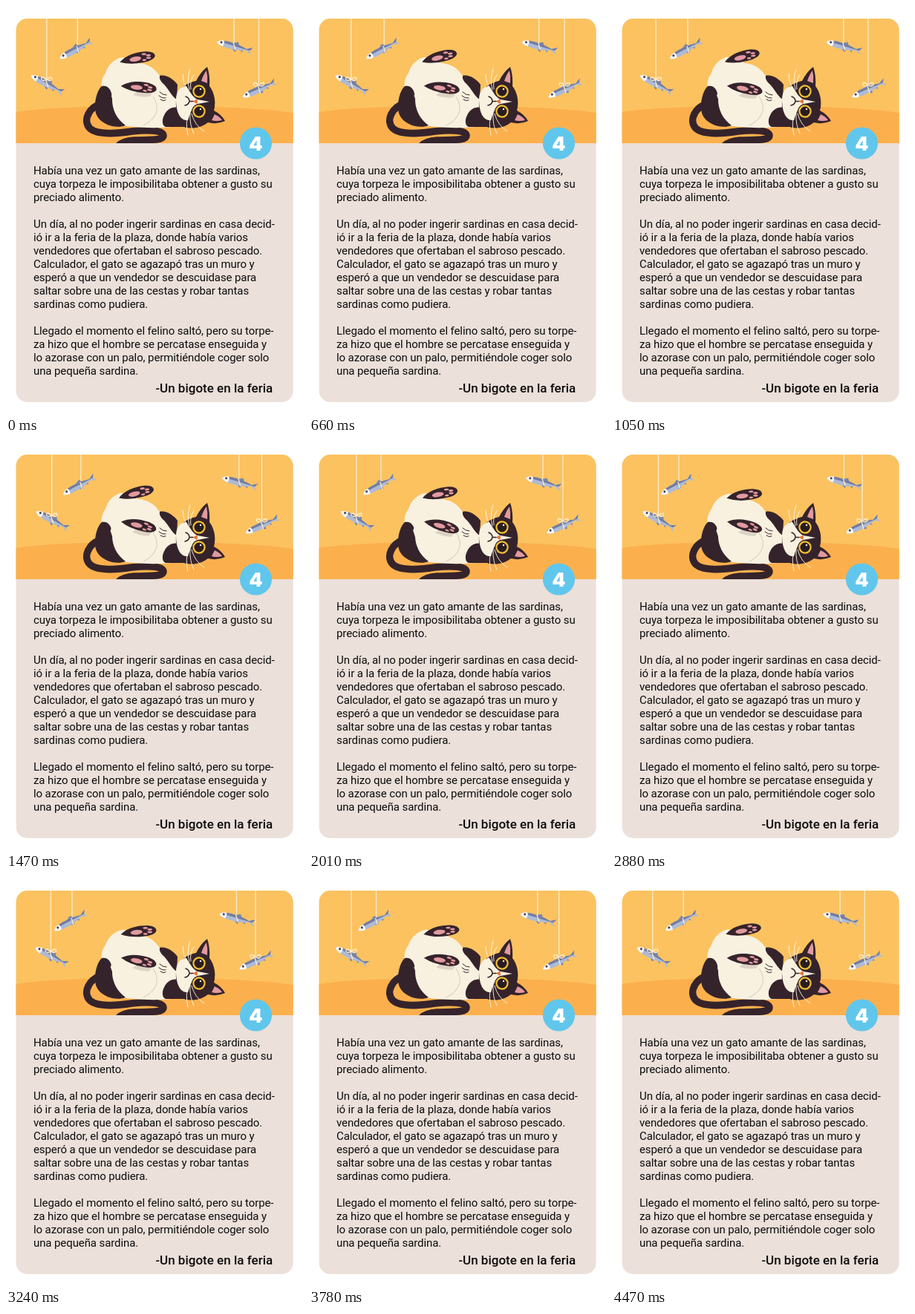
These frames come from a looping animation (400 by 550 pixels, 4.5 s). An HTML page:

```html
<!DOCTYPE html>
<html lang="es">
<head>
<meta charset="utf-8">
<style>
  html, body { margin: 0; height: 100%; overflow: hidden; background: #fff; }
  svg { display: block; width: 400px; height: 550px; }
  text { font-family: Roboto, sans-serif; fill: #0d0c0c; }
  #story { font-size: 15px; letter-spacing: -.1px; }
  #number { font: 900 26px Inter, sans-serif; fill: #fff; }
  .dark { fill: #35232b; }
  .cream { fill: #f8f1e0; }
  .pink { fill: #e19a9f; }
  .line { fill: none; stroke: #35232b; stroke-linecap: round; }
  .whisker { fill: none; stroke: #fff6e6; stroke-width: .9; stroke-linecap: round; }
  .string { fill: none; stroke: #fdeccb; stroke-width: 1.3; }
</style>
</head>
<body>
<svg viewBox="0 0 400 550">
  <defs>
    <clipPath id="card"><rect x="13.6" y="17" width="373" height="517" rx="15"/></clipPath>
    <clipPath id="scene"><rect x="13" y="17" width="374" height="168"/></clipPath>
    <g id="fish">
      <path fill="#7985ab" d="M-5-3 L4-7 L7-2Z M-3 3 L3 7 L5 2Z M8 2 L13 5 L12 1Z"/>
      <path fill="#aebad6" d="M-24 0 C-20-4-8-4 0-4 C8-3 13-2 17-1 L25-5 L22 0 L25 5 L17 1 C9 4-5 5-14 4 Q-22 3-24 0Z"/>
      <path fill="#717da3" d="M-15-4 C-8-5 8-4 17-1 L25-5 L22 0 C10 0-3-1-14-1Z"/>
      <path fill="#f8f6f4" d="M-24 0 Q-20-4-15-4 Q-13 0-15 4 Q-22 3-24 0Z"/>
      <circle cx="-18" cy="-1" r="1.5" fill="#3c4263"/>
    </g>
    <g id="paw">
      <path class="dark" d="M-24 4 C-15-5-2-8 12-8 Q24-7 24-1 Q22 5 8 6.5 Q-10 9-24 4Z"/>
      <g class="pink">
        <ellipse cx="-3" cy="1" rx="8" ry="3.2" transform="rotate(-6)"/>
        <ellipse cx="9" cy="-4.5" rx="3.2" ry="1.4"/>
        <ellipse cx="15" cy="-2.5" rx="3.2" ry="1.4"/>
        <ellipse cx="15" cy="1" rx="3.2" ry="1.4"/>
        <ellipse cx="9" cy="3.5" rx="2.8" ry="1.3"/>
      </g>
    </g>
    <g id="eye">
      <circle class="dark" r="10"/>
      <circle r="7.6" fill="#2a1c20" stroke="#f2c132" stroke-width="2.2"/>
      <circle cx="2" cy="-3" r="1.2" fill="#fff"/>
    </g>
  </defs>

  <g clip-path="url(#card)">
    <rect x="13" y="17" width="374" height="517" fill="#ebe0da"/>
    <g clip-path="url(#scene)">
      <rect x="13" y="17" width="374" height="168" fill="#fbc25f"/>
      <path fill="#fbb04d" d="M13 143 C80 132 300 131 387 144 V185 H13Z"/>
      <g id="hanging"></g>

      <path class="line" stroke-width="9.5" d="M130 131 C111 136 103 155 113 165 C123 174 150 172 169 169 C195 166 212 168 212 175 C212 182 190 180 172 181 Q156 182 150 190"/>
      <path class="cream" d="M129 113 C126 95 137 83 153 78 C178 73 197 78 206 93 Q217 104 232 118 L236 160 C222 166 172 165 152 160 C134 152 130 130 129 113Z"/>
      <path class="dark" d="M129 108 C138 106 143 114 143 126 C143 140 149 152 161 161 C148 166 128 160 122 147 C117 134 122 114 129 108Z"/>
      <path d="M198 122 C208 137 204 151 185 161" fill="none" stroke="#ddd3c4" stroke-width="1.3"/>
      <path class="dark" d="M207 94 C215 92 225 98 231 106 L230 126 C222 121 219 111 211 104 Q206 99 207 94Z"/>
      <path class="dark" d="M232 137 C220 134 213 144 211 153 Q210 161 215 163 H240Z"/>
      <path class="line" stroke-width="1" d="M207 116 q4 4 9 4 M206 121 q4 4 9 3 M208 126 q4 3 7 1"/>

      <g id="upperLeg">
        <path class="cream" d="M133 102 C132 84 143 72 157 69 L178 77 C180 87 172 93 159 94Z"/>
        <use href="#paw" transform="translate(177 70) rotate(-4)"/>
      </g>
      <g id="lowerLeg">
        <path fill="#ddd3c4" d="M158 108 C162 119 178 124 194 122 L198 116 L165 106Z"/>
        <path class="cream" d="M142 122 Q145 102 160 101 L176 116 Q163 128 147 132Z"/>
        <use href="#paw" transform="translate(179 109) rotate(12)"/>
      </g>

      <path class="dark" d="M229 126 C230 112 243 104 256 101 Q262 89 271 82 Q275 94 274 108 C281 117 283 130 280 141 Q290 146 295 155 Q284 160 272 157 C261 166 243 167 234 160 Q228 147 229 126Z"/>
      <path class="pink" d="M263 101 Q266 92 270 87 Q272 95 271 104Z M281 146 Q288 149 291 154 Q283 156 277 154Z"/>
      <path class="cream" d="M229 126 C229 114 236 108 243 108 C247 114 251 123 258 126 L274 129 L258 132 C251 135 248 145 245 154 C235 155 229 144 229 126Z"/>
      <use href="#eye" x="260" y="115"/>
      <use href="#eye" x="260" y="142"/>
      <path fill="#e8733b" d="M252 128.5 L257 125.5 Q259 128.5 257 132Z"/>
      <path class="line" stroke-width="1.5" d="M252 128.5 H247 M242 122 Q247 124 247 128.5 Q246 133 241 134"/>
      <path class="whisker" d="M245 114 Q238 104 238 92 M247 113 Q243 98 248 85 M249 112 Q247 101 253 93 M246 145 Q241 157 245 174 M248 145 Q247 160 253 172 M250 145 Q254 161 267 169"/>
    </g>
  </g>

  <circle cx="336.5" cy="185" r="21.6" fill="#61c6eb"/>
  <text id="number" x="336.5" y="194.5" text-anchor="middle">4</text>
  <g id="story"></g>
  <text x="359.2" y="521" text-anchor="end" font-size="17" font-weight="500">-Un bigote en la feria</text>
</svg>
<script>
const PERIOD = 4500;
const byId = id => document.getElementById(id);

const story = `Había una vez un gato amante de las sardinas,
cuya torpeza le imposibilitaba obtener a gusto su
preciado alimento.

Un día, al no poder ingerir sardinas en casa decid-
ió ir a la feria de la plaza, donde había varios
vendedores que ofertaban el sabroso pescado.
Calculador, el gato se agazapó tras un muro y
esperó a que un vendedor se descuidase para
saltar sobre una de las cestas y robar tantas
sardinas como pudiera.

Llegado el momento el felino saltó, pero su torpe-
za hizo que el hombre se percatase enseguida y
lo azorase con un palo, permitiéndole coger solo
una pequeña sardina.`;
byId('story').innerHTML = story.split('\n')
  .map((line, i) => `<text x="37" y="${227 + i * 18}">${line}</text>`).join('');

// Swing centre, height, tilt, reach and phase (fraction of a turn)
const sardines = [
  { x: 95.5, y: 59, tilt: -29, reach: 6.5, phase: .02, shift: -3 },
  { x: 59.5, y: 105, tilt: 28, reach: 4.7, phase: -.25, bow: true },
  { x: 311, y: 54.5, tilt: 15, reach: 4, phase: -.2 },
  { x: 340.5, y: 112.5, tilt: -25, reach: 4.5, phase: 0, bow: true },
];
byId('hanging').innerHTML = sardines.map(({ y, tilt, bow, shift = 0 }) => `<g>
  <path class="string" d="M0 17 V${y - 3}"/>
  <use href="#fish" transform="translate(${shift} ${y}) rotate(${tilt})"/>
  <path class="string" d="M-1 ${y - 5} L2 ${y + 5}"/>
  ${bow ? `<path class="string" d="M0 ${y - 6} q-8-6-7 0 q2 3 7 0 q8-6 7 0 q-2 3-7 0"/>` : ''}
</g>`).join('');
const hanging = [...byId('hanging').children];

function draw(now) {
  const turn = now % PERIOD / PERIOD;
  const wave = phase => Math.sin((turn + phase) * 2 * Math.PI);
  sardines.forEach(({ x, reach, phase }, i) =>
    hanging[i].setAttribute('transform', `translate(${x + reach * wave(phase)} 0)`));
  byId('upperLeg').setAttribute('transform', `rotate(${-4 * wave(0)} 150 95)`);
  byId('lowerLeg').setAttribute('transform', `rotate(${5 * (1 - wave(.25))} 158 110)`);
  requestAnimationFrame(draw);
}
draw(performance.now());
</script>
</body>
</html>
```
